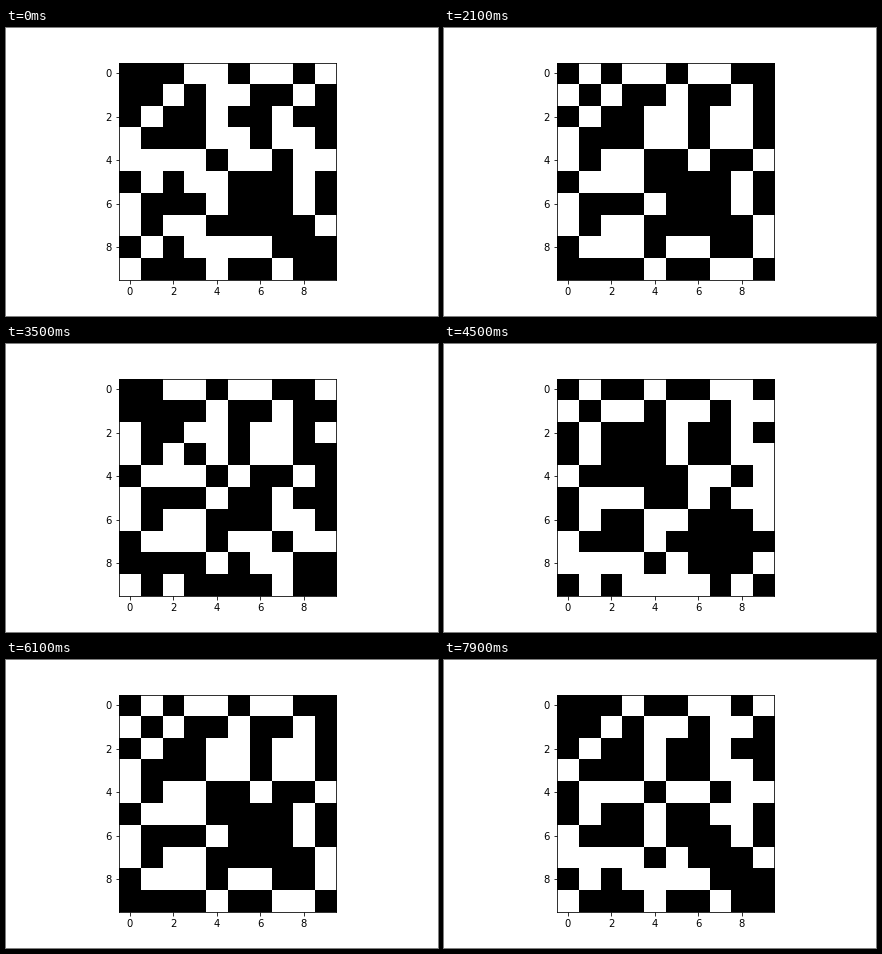
A matplotlib script that plays this animation: 432 px wide and 288 px high, repeating every 8 s.

```python
import matplotlib.pyplot as plt
import numpy as np
from matplotlib.animation import FuncAnimation

N = 10
FRAMES = 80
STEP_MS = 100
PERIOD = 20   # steps per oscillation
LAG = 2       # radians between consecutive pairs

rows, cols = np.triu_indices(N, k=1)
lags = LAG * np.arange(len(rows))


def adjacency(t):
    """Symmetric matrix whose pairs switch on while their sine is positive."""
    grid = np.zeros((N, N))
    grid[rows, cols] = np.sin(2 * np.pi * t / PERIOD - lags) > 0
    return grid + grid.T


plt.rcParams["font.family"] = "DejaVu Sans"
plt.rcParams["font.size"] = 10

fig, ax = plt.subplots(figsize=(6, 4), dpi=72, facecolor="white")
fig.subplots_adjust(left=0.125, right=0.9, bottom=0.125, top=0.88)
image = ax.imshow(adjacency(0), cmap="gray", vmin=0, vmax=1,
                  interpolation="nearest")
ax.set_xticks(range(0, N, 2))
ax.set_yticks(range(0, N, 2))


def update(t):
    image.set_data(adjacency(t))
    return [image]


anim = FuncAnimation(fig, update, frames=FRAMES, interval=STEP_MS,
                     repeat=True, repeat_delay=0)
plt.show()
```
